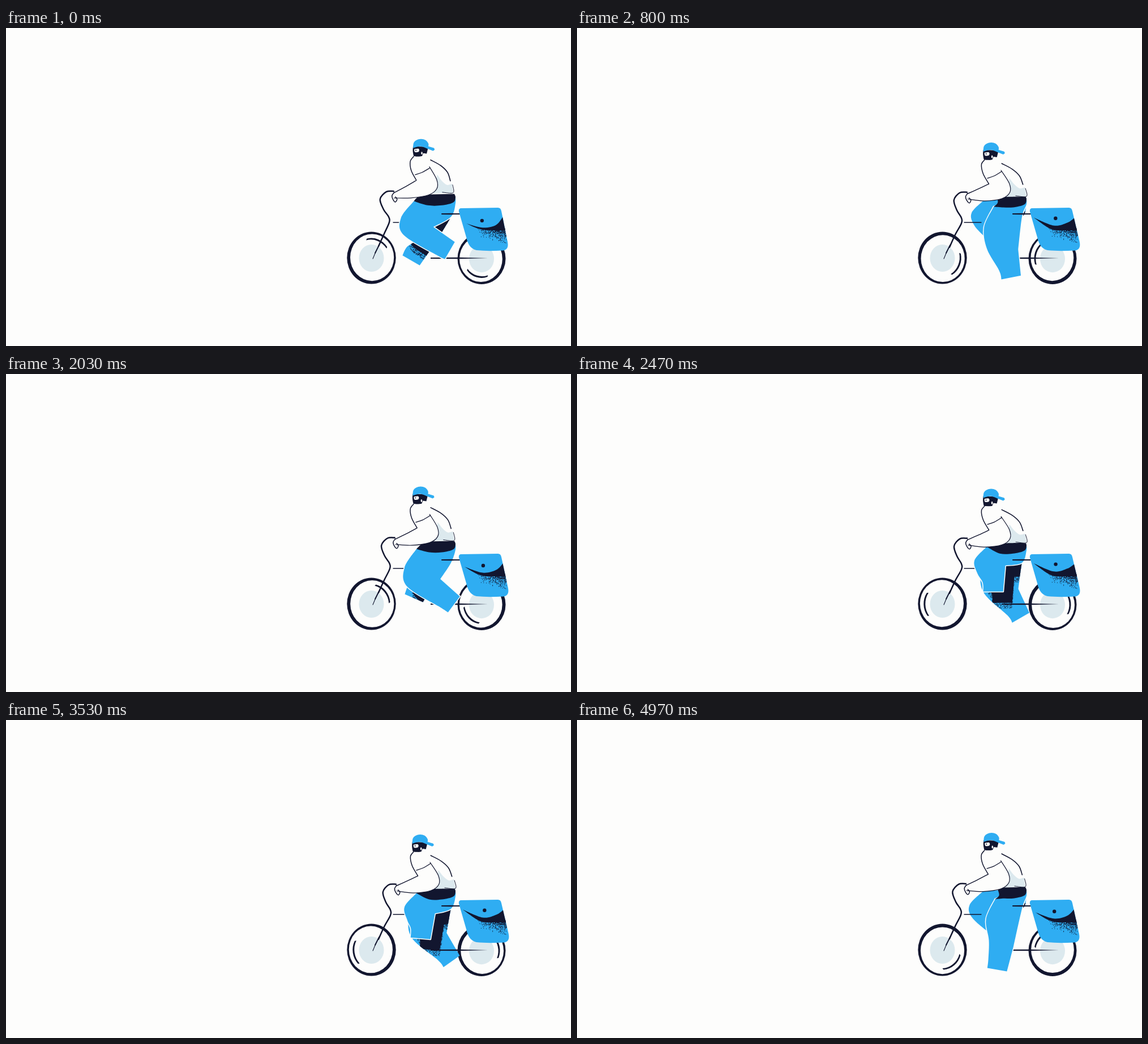
Write an HTML page with a canvas that moves like this. It is 998 px wide and 561 px high and loops after 5010 ms.

```html
<!DOCTYPE html>
<html lang="en">
<head>
<meta charset="utf-8">
<title>Cyclist</title>
<style>
  html, body { margin: 0; width: 100%; height: 100%; overflow: hidden; background: #fdfdfc; }
  canvas { display: block; }
</style>
</head>
<body>
<canvas id="stage" width="998" height="561"></canvas>
<script>
const ctx = document.getElementById('stage').getContext('2d');
const BLUE = '#2fadf2', NAVY = '#12162f', PALE = '#dce9ee', WHITE = '#fdfdfc';
const LOOP = 5010, STEP = 1000 / 24, TURN = 25.5, TAU = Math.PI * 2, DEG = TAU / 360;

let step = 0, dip = 0;

// Value that swings once per pedal turn and is largest at step `peak`
const wave = (at, peak, mean, amp) => mean + amp * Math.cos(TAU * (at - peak) / TURN);

// Upper body dips with each half turn: hands slide back, head and chest sink
const sway = (x, y) => [
  x + dip * Math.min((y - 230) / 13, Math.max(0, 363 - y) / 9),
  y + dip * Math.max(2, Math.min(7, (x - 680) / 6))
];
function bend(v) {
  const out = [];
  for (let i = 0; i < v.length; i += 2) out.push(...sway(v[i], v[i + 1]));
  return out;
}

// Smooth curve through flat x, y points, joined to the path so far
function curve(path, v, join) {
  const n = v.length / 2;
  const at = i => { i = Math.max(0, Math.min(n - 1, i)); return [v[2 * i], v[2 * i + 1]]; };
  if (join) path.lineTo(...at(0)); else path.moveTo(...at(0));
  for (let i = 0; i < n - 1; i++) {
    const [a, b, c, d] = [at(i - 1), at(i), at(i + 1), at(i + 2)];
    path.bezierCurveTo(b[0] + (c[0] - a[0]) / 6, b[1] + (c[1] - a[1]) / 6,
      c[0] - (d[0] - b[0]) / 6, c[1] - (d[1] - b[1]) / 6, c[0], c[1]);
  }
  return path;
}
// Several curves joined by corners
const shape = (...parts) => parts.reduce((p, v, i) => curve(p, v, i > 0), new Path2D());

function fill(path, color) { ctx.fillStyle = color; ctx.fill(path); }
function stroke(path, width, color = NAVY) {
  ctx.lineWidth = width;
  ctx.strokeStyle = color;
  ctx.stroke(path);
}
function oval(x, y, rx, ry, color) {
  const p = new Path2D();
  p.ellipse(x, y, rx, ry, 0, 0, TAU);
  fill(p, color);
}
function inside(path, draw) {
  ctx.save();
  ctx.clip(path);
  draw();
  ctx.restore();
}
function taper(x, y, end) {
  const mid = (x + end) / 2;
  fill(new Path2D(`M${x} ${y - .9}L${mid} ${y - 1.3}L${end} ${y}L${mid} ${y + 1.3}L${x} ${y + .9}Z`), NAVY);
}

let seed = 7;
const rand = () => (seed = seed * 16807 % 2147483647) / 2147483647;

// Grain for the shaded leg and the bag
const grain = (() => {
  const tile = document.createElement('canvas');
  tile.width = tile.height = 48;
  const g = tile.getContext('2d');
  g.fillStyle = NAVY;
  for (let i = 0; i < 900; i++) g.fillRect(rand() * 48, rand() * 48, 1, 1);
  return ctx.createPattern(tile, 'repeat');
})();
const specks = Array.from({ length: 560 }, () => {
  const u = Math.sqrt(rand());
  return [832 + 52 * u, 353 + rand() * rand() * (17 + 11 * u)];
});

function wheel(x, y, rx, ry, thin, gleamAt) {
  const turn = step / TURN * TAU, a = turn + thin, b = turn + gleamAt;
  oval(x, y, rx, ry, NAVY);
  oval(x + 1.3 * Math.cos(a), y - 1.3 * Math.sin(a), rx - 4.6, ry - 4.6, WHITE);
  oval(x, y + .5, 22, 24, PALE);
  // Tapered gleam turning with the wheel
  const gleam = new Path2D();
  gleam.ellipse(x, y, rx - 10, ry - 11, 0, -b - .62, -b + .62);
  gleam.ellipse(x - 3 * Math.cos(b), y + 3 * Math.sin(b), rx - 10, ry - 11, 0, -b + .62, -b - .62, true);
  fill(gleam, NAVY);
}

// Trouser leg from the pedal circle: the foot leads, shin and knee follow
function leg(at) {
  const pedal = (at / TURN * 360 + wave(at, 24.5, 18, 20)) * DEG;
  const foot = [754 + 38 * Math.cos(pedal), 411 - 31 * Math.sin(pedal)];
  const tilt = wave(at, 13, 75, 45) * DEG, c = Math.cos(tilt), s = Math.sin(tilt);
  const shin = (along, side) => [foot[0] + along * c + side * s, foot[1] + along * s - side * c];
  const waist = [wave(at, 16, 728, 11), wave(at, 17, 309, 7)];
  const knee = [wave(at, 16, 708, 15), wave(at, 18, 339, 13)];
  const path = shape(
    [...waist, ...knee, knee[0] + 5, knee[1] + wave(at, 19, 30, 8), ...shin(-16, -19), ...shin(0, -18)],
    shin(0, 17),
    [...shin(-46, 21), 786, 333, 794, 309 + dip * 2, 793, 296 + dip * 3]
  );
  path.closePath();
  return { path, waist };
}

function legs() {
  const near = leg(step), far = leg(step + TURN / 2);
  fill(far.path, BLUE);
  // The near leg's shadow falls on the far one
  inside(far.path, () => {
    ctx.translate(16, 30);
    fill(near.path, grain);
    ctx.translate(0, -10);
    fill(near.path, NAVY);
  });
  stroke(shape([684, 343, 714, 343]), 1.3);
  taper(750, 406, 851);
  stroke(near.path, 3, WHITE);
  fill(near.path, BLUE);
  return near.waist;
}

function head() {
  const [x, y] = sway(733, 210);
  ctx.save();
  ctx.translate(x - 733, y - 210);
  fill(shape([719, 209, 718.5, 217, 720, 226], [727, 228, 735, 226], [737, 221, 743, 222], [746, 210]), NAVY);
  fill(shape([721, 214, 728, 213, 730, 216, 728, 219, 722, 219, 721, 214]), WHITE);
  oval(724, 216, 1, 1, NAVY);
  oval(734.5, 221, 1.3, 2.6, WHITE);
  fill(shape([719, 212, 720, 203, 725, 198, 733, 196, 741, 198, 746, 204, 746, 209],
    [756, 212, 757, 215, 754, 217], [744, 213, 732, 209, 719, 212]), BLUE);
  ctx.restore();
}

function rider([wx, wy]) {
  const low = dip * 4;
  fill(shape([wx, wy, wx + 7, wy - 7, 742, 294 + low],
    [792, 293 + low, 794, 299 + low, 790, 308 + low, 770, 313 + low, (wx + 770) / 2, 313 + low, wx, wy]), NAVY);

  head();
  const chest = bend([720, 227, 714, 236, 716, 252, 725, 269]);
  const back = bend([785, 270, 780, 255, 768, 243, 750, 233]);
  const hem = bend([757, 291, 790, 292]);
  fill(shape(chest, hem, back, bend([735, 227])), WHITE);
  fill(shape(bend([762, 259, 770, 270, 779, 277, 788, 275]), bend([790, 291, 752, 292])), PALE);
  stroke(shape(chest), 1.5);
  stroke(shape(back), 1.6);
  stroke(shape(bend([789, 277, 790, 291, 771, 290])), 1);

  const top = bend([725, 269, 706, 280, 685, 291]);
  const under = bend([686, 300, 715, 300, 746, 295, 761, 284, 761, 268, 748, 245]);
  fill(shape(top, under), WHITE);
  stroke(shape(top), 1.4);
  stroke(shape(under), 1.2);
  stroke(shape(bend([723, 259, 735, 255, 749, 247])), 1.3);
  stroke(shape(bend([686, 290, 682, 296, 684, 303, 688, 307, 691, 302, 688, 298])), 1.5);
}

function handlebar() {
  stroke(shape(bend([685, 288, 672, 289, 661, 302, 667, 320, 676, 333, 677, 343, 668, 363, 658, 385])), 2.5);
  taper(770, 328, 806);
  stroke(shape([770, 328, 803, 328]), 2.2);
  stroke(shape([659, 383, 652, 397]), 1.9);
  stroke(shape([653, 395, 648, 407]), 1.1);
}

function bag() {
  const w = dip * 2;
  const body = new Path2D(`M803 318L869 317Q874 317 875 323L${886 + w} 377Q${889 + w} 392 ${877 + w} 392.5
    Q850 394 831 392Q817 389 813 369L800 324Q799 319 803 318Z`);
  fill(body, BLUE);
  inside(body, () => {
    ctx.fillStyle = NAVY;
    for (const [x, y] of specks) ctx.fillRect(x, y - dip, 1, 1);
    const left = [812 - 6 * dip, 344 - 11 * dip], lift = 4 * dip;
    fill(shape([...left, 842, 352 - lift, 866, 347 - lift, 879, 331 + lift],
      [890, 357, 866, 357, 838, 355, ...left]), NAVY);
  });
  oval(841 + 5 * dip, 339.7 - 4.5 * dip, 3.2, 3.2, NAVY);
}

function draw(time) {
  step = Math.floor((time + 20) / STEP);
  dip = .42 - .52 * Math.cos(TAU * (step - 1) / (TURN / 2));

  ctx.fillStyle = WHITE;
  ctx.fillRect(0, 0, 998, 561);
  wheel(645.5, 405.5, 43.2, 46, .55, 1.2);
  wheel(840, 406.7, 42.5, 45.2, 3.7, 4.42);
  rider(legs());
  handlebar();
  bag();
}

ctx.lineCap = ctx.lineJoin = 'round';
const start = performance.now();
function tick() {
  draw((performance.now() - start) % LOOP);
  requestAnimationFrame(tick);
}
tick();
</script>
</body>
</html>
```
